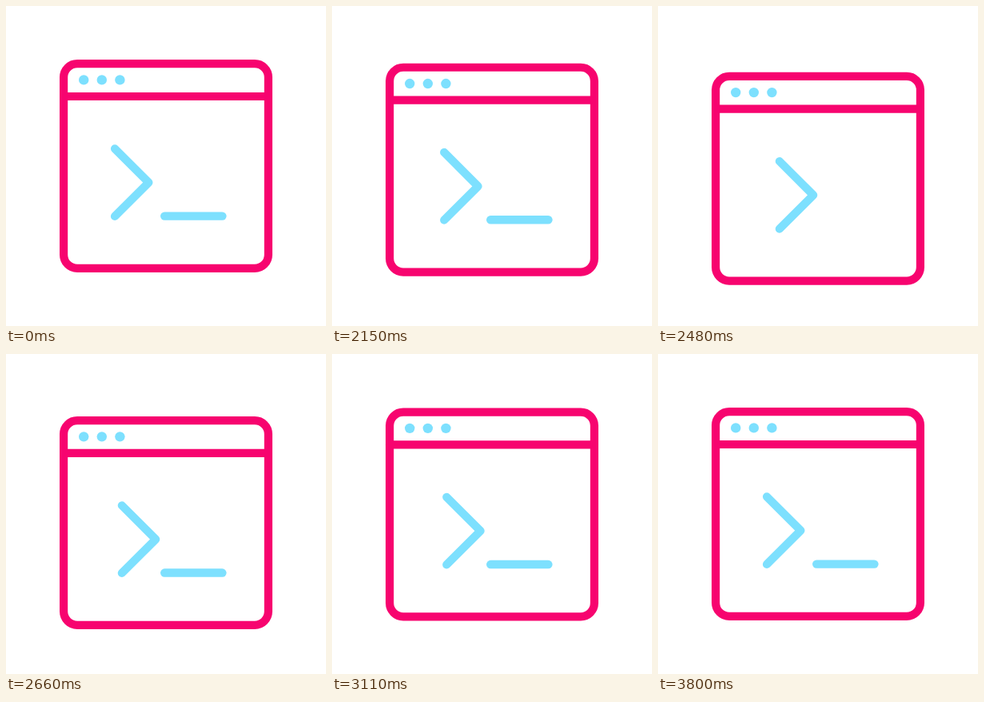
An HTML page with a canvas that plays this animation: 400x400 px, repeating every 3.86 s.

```html
<!DOCTYPE html>
<html lang="en">
<head>
<meta charset="utf-8">
<title>Terminal window</title>
<style>
html, body { margin: 0; width: 100%; height: 100%; overflow: hidden; background: #fff; }
canvas { display: block; width: 100vmin; height: 100vmin; }
</style>
</head>
<body>
<canvas id="stage"></canvas>
<script>
const SIZE = 400, LOOP = 3860, HOLD = 2000, STEP = 30, LAST = 60;
const PINK = '#f7046f', CYAN = '#7de0fe';
const canvas = document.getElementById('stage');
const ctx = canvas.getContext('2d');
const scale = window.devicePixelRatio || 1;
canvas.width = canvas.height = SIZE * scale;

const smooth = x => x * x * (3 - 2 * x);

// cubic-bezier(x1, 0, x2, 1)
function ease(x, x1, x2) {
  let lo = 0, hi = 1;
  for (let i = 0; i < 30; i++) {
    const t = (lo + hi) / 2, u = 1 - t;
    if (3 * u * u * t * x1 + 3 * u * t * t * x2 + t * t * t < x) lo = t;
    else hi = t;
  }
  return smooth(lo);
}

// The window sinks quickly, then floats back up.
function drop(n) {
  if (n < 14) return 16 * smooth(n / 14);
  if (n < 42) return 16 * (1 - ease((n - 14) / 28, 0.3125, 0.365));
  return 0;
}

// The prompt nudges right and back twice.
function nudge(n) {
  const p = (n % 30) / 15;
  return 16 * smooth(p < 1 ? p : 2 - p);
}

const cursorOn = n => Math.floor(n / 9) % 2 === 0;

function line(color, width, ...points) {
  ctx.strokeStyle = color;
  ctx.lineWidth = width;
  ctx.beginPath();
  points.forEach(([x, y]) => ctx.lineTo(x, y));
  ctx.stroke();
}

function roundBox(x, y, w, h, r) {
  ctx.beginPath();
  ctx.moveTo(x + r, y);
  ctx.arcTo(x + w, y, x + w, y + h, r);
  ctx.arcTo(x + w, y + h, x, y + h, r);
  ctx.arcTo(x, y + h, x, y, r);
  ctx.arcTo(x, y, x + w, y, r);
  ctx.closePath();
}

function draw(n) {
  ctx.setTransform(scale, 0, 0, scale, 0, 0);
  ctx.fillStyle = '#fff';
  ctx.fillRect(0, 0, SIZE, SIZE);
  ctx.lineCap = ctx.lineJoin = 'round';
  ctx.translate(0, drop(n));

  ctx.fillStyle = CYAN;
  for (let i = 0; i < 3; i++) {
    ctx.beginPath();
    ctx.arc(97.2 + 22.6 * i, 92.4, 6.2, 0, Math.PI * 2);
    ctx.fill();
  }

  const x = 136 + nudge(n);
  line(CYAN, 10.2, [x, 178.3], [x + 42.4, 220.6], [x, 262.9]);
  if (cursorOn(n)) line(CYAN, 10.4, [198.2, 262.6], [270.4, 262.6]);

  line(PINK, 10.2, [72.1, 113], [327.9, 113]);
  roundBox(72.1, 72.1, 255.8, 255.8, 17);
  ctx.stroke();
}

const start = performance.now();
function tick() {
  const t = (performance.now() - start) % LOOP;
  draw(Math.min(LAST, Math.max(0, Math.floor((t - HOLD) / STEP))));
  requestAnimationFrame(tick);
}
tick();
</script>
</body>
</html>
```
